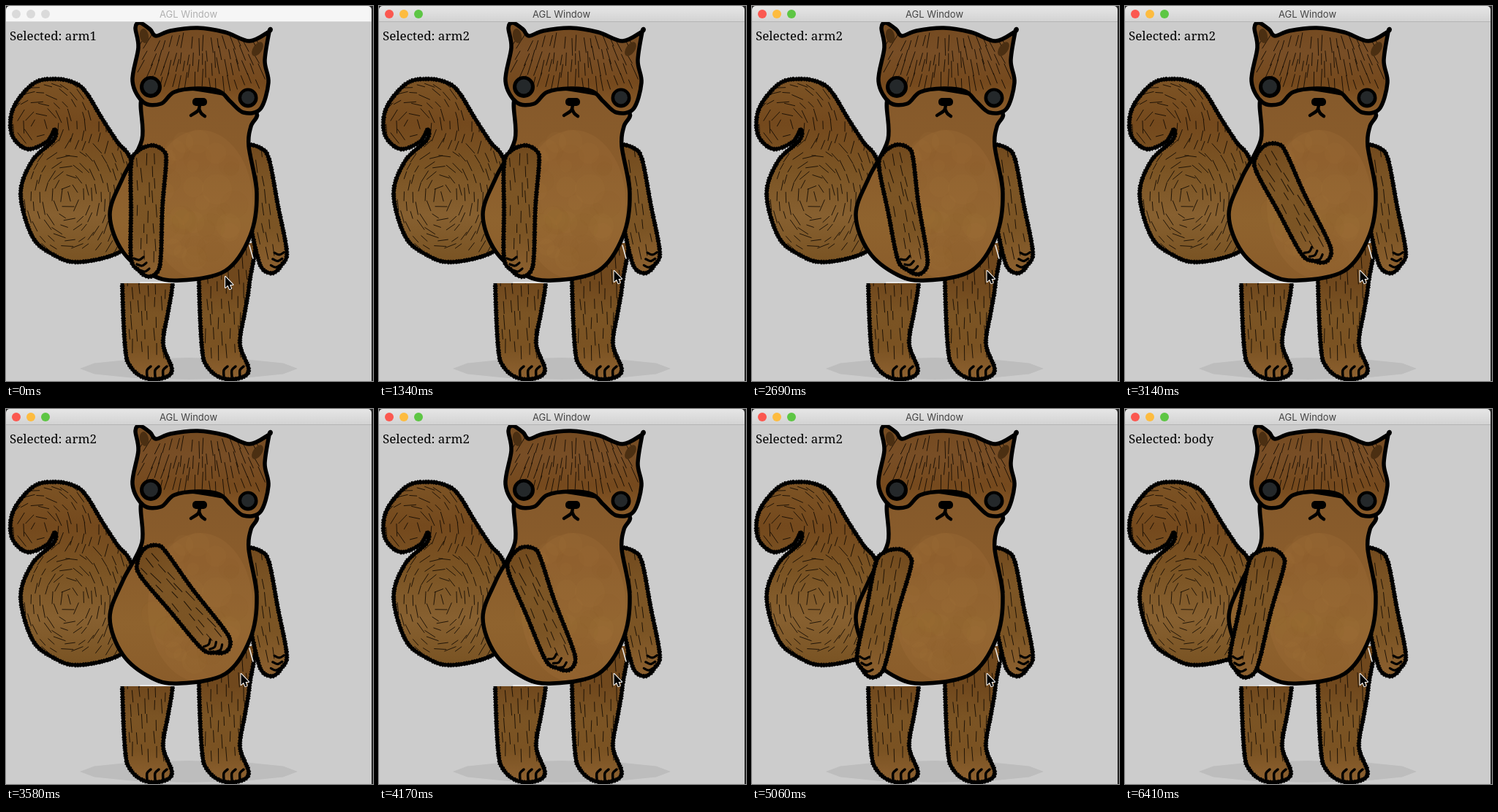
An HTML page with a canvas for the animation above (8 s loop, 502 by 514 pixels).

```html
<!DOCTYPE html>
<html lang="en">
<head>
<meta charset="utf-8">
<title>AGL Window</title>
<style>
  html, body { margin: 0; width: 100%; height: 100%; overflow: hidden; background: #ccc; }
  canvas { display: block; }
</style>
</head>
<body>
<canvas id="stage" width="502" height="514"></canvas>
<script>
const ctx = document.getElementById('stage').getContext('2d');
const LOOP = 8000, TICK = 149, INK = '#000';

// Key presses, one character per tick: each turns the arm by whole steps.
const ARM_KEYS = '+.++++.++.=.-------', FIRST_KEY = 16, ARM_STEP = .1;
const TURN = { '+': 1, '-': -1, '=': -2, '.': 0 };
const armStep = tick => [...ARM_KEYS.slice(0, Math.max(0, tick - FIRST_KEY + 1))]
  .reduce((sum, key) => sum + TURN[key], 0);

// Smooth closed (or open) curve through a flat list of x, y key points.
function smooth(points, closed = true) {
  const n = points.length / 2, path = new Path2D();
  const at = i => {
    i = closed ? (i + n) % n : Math.max(0, Math.min(n - 1, i));
    return [points[2 * i], points[2 * i + 1]];
  };
  path.moveTo(...at(0));
  for (let i = 0; i < (closed ? n : n - 1); i++) {
    const [a, b, c, d] = [at(i - 1), at(i), at(i + 1), at(i + 2)];
    path.bezierCurveTo(b[0] + (c[0] - a[0]) / 6, b[1] + (c[1] - a[1]) / 6,
      c[0] - (d[0] - b[0]) / 6, c[1] - (d[1] - b[1]) / 6, ...c);
  }
  if (closed) path.closePath();
  return path;
}

const tail = smooth([172,214, 152,186, 130,152, 112,122, 97,107, 70,100, 38,106, 10,140, 8,176, 29,196,
  56,186, 67,169, 65,184, 36,212, 20,257, 36,316, 65,341, 99,351, 156,337, 190,300]);
const body = smooth([186,125, 186,183, 160,235, 142,286, 160,337, 200,369, 238,376, 300,363, 334,315,
  343,257, 332,192, 335,165, 343,147, 318,125, 220,110]);
const head = smooth([181,57, 177,30, 183,23, 197,32, 205,41, 225,34, 262,30, 300,36, 333,48, 360,35, 360,35,
  354,75, 359,105, 348,141, 325,146, 307,131, 292,117, 262,113, 230,118, 212,134, 188,132, 173,103]);
const arm = smooth([171,217, 180,199, 200,191, 216,199, 219,215, 214,275, 212,340, 208,363, 195,371,
  181,362, 171,345, 171,280]);
const leg = smooth([159,300, 159,380, 163,468, 170,494, 190,510, 215,510, 227,498, 215,463, 222,418,
  228,380, 233,300]);

function seeded(seed) {
  return () => (seed = seed * 16807 % 2147483647) / 2147483647;
}

// Short fur strokes on a jittered grid; direction(x, y) gives their angle.
function hatch(shape, [x0, y0, x1, y1], [dx, dy], length, direction, seed) {
  const random = seeded(seed);
  ctx.save();
  ctx.clip(shape);
  ctx.beginPath();
  for (let y = y0, row = 0; y < y1; y += dy, row++) {
    for (let x = x0 + (row % 2) * dx / 2; x < x1; x += dx) {
      const cx = x + (random() - .5) * dx * .5, cy = y + (random() - .5) * dy * .6;
      const half = length * (.35 + random() * .3), a = direction(cx, cy) + (random() - .5) * .16;
      ctx.moveTo(cx - half * Math.cos(a), cy - half * Math.sin(a));
      ctx.lineTo(cx + half * Math.cos(a), cy + half * Math.sin(a));
    }
  }
  ctx.lineWidth = 1;
  ctx.strokeStyle = 'rgba(16,9,2,.85)';
  ctx.stroke();
  ctx.restore();
}

function vertical(y0, y1, ...colors) {
  const g = ctx.createLinearGradient(0, y0, 0, y1);
  colors.forEach((c, i) => g.addColorStop(i / (colors.length - 1), c));
  return g;
}

function fill(shape, color) {
  ctx.fillStyle = color;
  ctx.fill(shape);
}

function line(shape, width, color = INK) {
  ctx.strokeStyle = color;
  ctx.lineWidth = width;
  ctx.stroke(shape);
}

// An uneven dashed second pass roughens the edge.
function furryOutline(shape) {
  line(shape, 5);
  ctx.save();
  ctx.lineCap = 'butt';
  ctx.setLineDash([1.5, 2, 1, 3, 2, 1.5]);
  line(shape, 6.5);
  ctx.restore();
}

function disc(x, y, r, color, ry = r, tilt = 0) {
  ctx.beginPath();
  ctx.ellipse(x, y, r, ry, tilt, 0, 7);
  ctx.fillStyle = color;
  ctx.fill();
}

function drawShadow() {
  ctx.beginPath();
  for (let a = 0; a < 2 * Math.PI; a += Math.PI / 6)
    ctx.lineTo(250 + 149 * Math.cos(a), 497 + 15 * Math.sin(a));
  ctx.fillStyle = '#bdbdbd';
  ctx.fill();
}

function drawLeg(shift, top, seed) {
  ctx.save();
  ctx.translate(shift, 0);
  ctx.beginPath();
  ctx.rect(100, top, 200, 514 - top);
  ctx.clip();
  fill(leg, vertical(380, 510, '#70481d', '#7b5424', '#7a5222', '#8d6130'));
  hatch(leg, [168, 330, 226, 485], [11, 20], 16, () => 1.53, seed);
  furryOutline(leg);
  for (let x = 193; x < 220; x += 11)
    line(smooth([x + 5, 494, x, 499, x, 508], false), 3.5);
  ctx.restore();
}

// Strokes follow nested rings, stretched upright by the given factor.
const rings = (cx, cy, stretch) => (x, y) => Math.atan2((x - cx) * stretch, cy - y);
const curlFur = rings(45, 165, 1), bulbFur = rings(85, 262, 2);

function drawTail() {
  fill(tail, vertical(98, 350, '#7d5425', '#74491d', '#7b5424', '#876030', '#795323'));
  hatch(tail, [12, 108, 174, 346], [14, 14], 14, (x, y) => (y < 195 ? curlFur : bulbFur)(x, y), 77);
  furryOutline(tail);
}

// The shoulder is the pivot; mirror is 1 or -1.
function drawArm(x, y, angle, mirror, seed) {
  ctx.save();
  ctx.translate(x, y);
  ctx.rotate(angle);
  ctx.scale(mirror, 1);
  ctx.translate(-195, -205);
  fill(arm, vertical(190, 372, '#71491d', '#7c5525', '#7b5424', '#8d6130'));
  hatch(arm, [182, 209, 212, 344], [12, 19], 16, () => 1.53, seed);
  furryOutline(arm);
  for (let toe = 0; toe < 3; toe++) {
    const tx = 175 + 4 * toe, ty = 346 + 8 * toe;
    line(smooth([tx, ty, tx + 7, ty + 2, tx + 13, ty - 2], false), 3.2);
  }
  ctx.restore();
}

function drawBody() {
  fill(body, vertical(130, 376, '#865a2b', '#8a5c2b', '#8f632e', '#8a5c2a'));
  ctx.save();
  ctx.clip(body);
  disc(266, 272, 72, 'rgba(160,112,58,.28)', 102);
  const random = seeded(5);
  for (let i = 0; i < 40; i++) {
    const a = random() * 7, r = Math.sqrt(random());
    const tone = i % 2 ? 'rgba(165,118,60,.1)' : 'rgba(125,82,36,.07)';
    disc(262 + 62 * r * Math.cos(a), 272 + 90 * r * Math.sin(a), 8 + 14 * random(), tone);
  }
  ctx.restore();
  line(body, 5.5);
}

function drawEye(x, y, r) {
  disc(x, y, r, INK);
  disc(x, y - .5, r * .66, '#24282a');
}

function drawHead() {
  fill(head, vertical(24, 146, '#744a20', '#784e26', '#75491d', '#895b29'));
  hatch(head, [186, 52, 352, 108], [9.5, 17], 18, (x, y) => Math.atan2(y + 85, x - 266), 19);
  disc(189, 41, 6, '#4b2f12', 10, -.2);
  disc(344, 59, 6, '#4b2f12', 11, .6);
  line(head, 5.5);
  drawEye(198, 111, 15);
  drawEye(331, 126, 13.5);

  ctx.beginPath();
  ctx.roundRect(255, 126, 20, 11, 5);
  ctx.fillStyle = INK;
  ctx.fill();
  line(smooth([265, 135, 263, 143, 253, 150], false), 4.5);
  line(smooth([264, 141, 267, 147, 272, 151], false), 4.5);
}

function drawWindow(active) {
  ctx.fillStyle = '#262626';
  ctx.fillRect(0, 0, 502, 22);
  ctx.fillRect(500, 0, 2, 514);
  ctx.beginPath();
  ctx.roundRect(0, 0, 500, 22, [5, 5, 0, 0]);
  ctx.fillStyle = active ? vertical(0, 22, '#e6e6e6', '#d2d2d2') : '#f6f6f6';
  ctx.fill();
  ctx.fillStyle = active ? '#b4b4b4' : '#d6d6d6';
  ctx.fillRect(0, 21, 500, 1);
  ['#fb5850', '#fdbc40', '#5dc644'].forEach((color, i) =>
    disc(14 + 20 * i, 11, 6, active ? color : '#dadada'));
  write('AGL Window', 249.5, 16, '13px Inter, Roboto, sans-serif', 'center', active ? '#444' : '#b0b0b0');
}

function write(text, x, y, font, align, color) {
  ctx.font = font;
  ctx.textAlign = align;
  ctx.fillStyle = color;
  ctx.fillText(text, x, y);
}

function drawCursor(x, y) {
  ctx.save();
  ctx.translate(x, y);
  const arrow = new Path2D('M0 0V15L3.5 11.8 5.8 17.2 8.2 16.2 6 11H10.5Z');
  line(arrow, 2, '#fff');
  fill(arrow, INK);
  ctx.restore();
}

function draw(t) {
  const tick = Math.floor((t + 10) / TICK);
  ctx.fillStyle = '#ccc';
  ctx.fillRect(0, 0, 502, 514);
  ctx.lineCap = ctx.lineJoin = 'round';
  drawShadow();
  drawLeg(0, 380, 11);
  drawLeg(105, 325, 23);
  line(new Path2D('M184 379H228'), 2, '#e8e8e8');
  drawTail();
  drawArm(334, 203, -.19, -1, 31);
  line(new Path2D('M333 328L338 346'), 1.5, '#eee');
  drawBody();
  drawHead();
  drawArm(195, 205, -ARM_STEP * armStep(tick), 1, 53);
  drawWindow(tick >= 7);

  const selected = tick < 9 ? 'arm1' : tick < 43 ? 'arm2' : 'body';
  write('Selected: ' + selected, 5, 47, '17px "Noto Serif", serif', 'left', INK);
  if (tick < 5) drawCursor(300, 371);
  else if (tick < 6) drawCursor(305, 370);
  else drawCursor(321.5, 363);
}

const start = performance.now();
function animate() {
  draw((performance.now() - start) % LOOP);
  requestAnimationFrame(animate);
}
animate();
</script>
</body>
</html>
```
